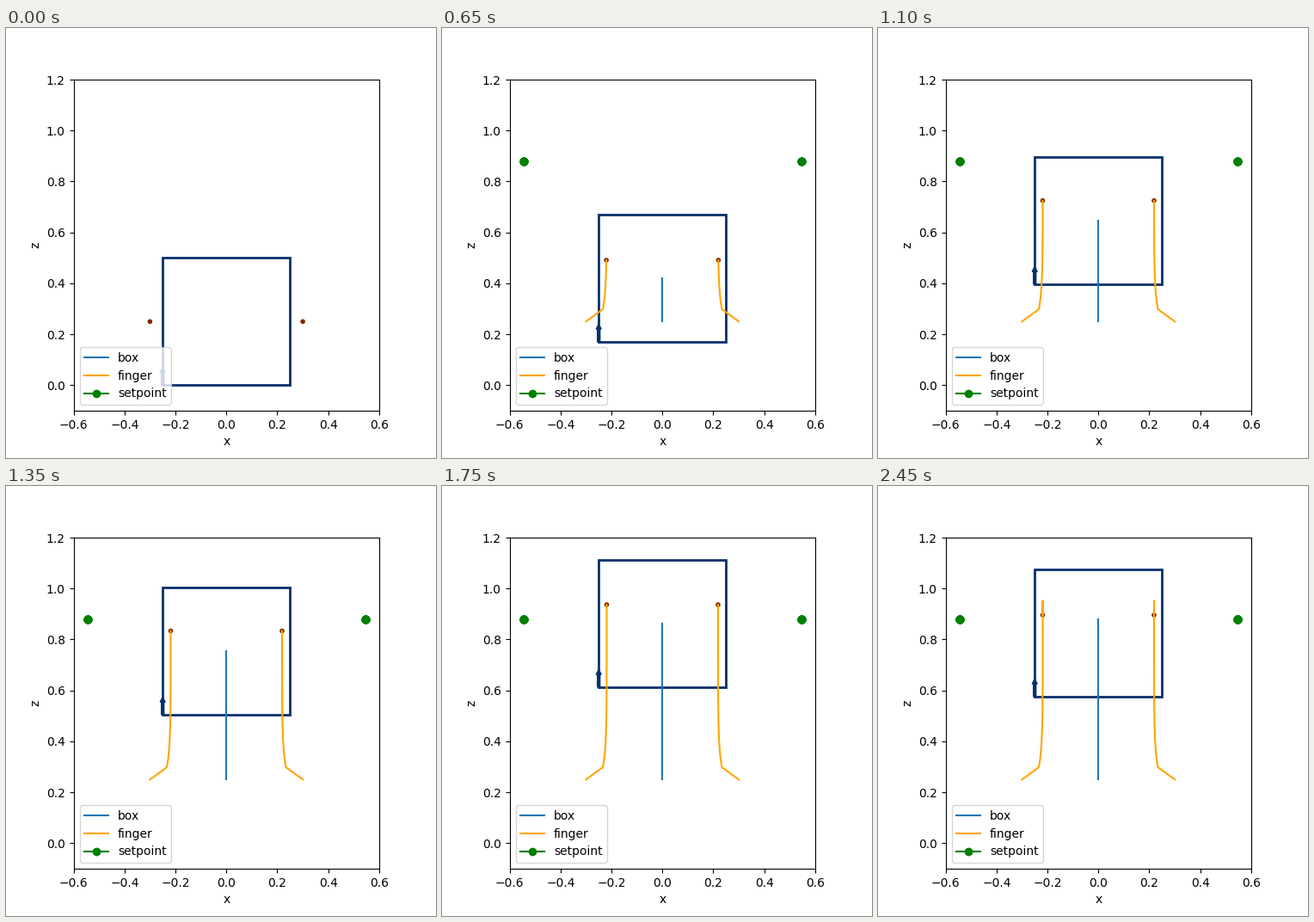
Animation, 500 px wide and 500 px high, one loop 2500 ms. Source, as a matplotlib script:

```python
import numpy as np
import matplotlib.pyplot as plt
from matplotlib.animation import FuncAnimation
from matplotlib.patches import Circle, FancyArrow, Rectangle

FRAMES, STEP_MS = 50, 50
HALF = 0.25
NAVY, BROWN = "#08306b", "#7f2704"
SETPOINT = (0.545, 0.88)

# Height of the box floor, and of the fingers above it, at key frames
KEYS = np.array([1, 4, 8, 12, 17, 27, 35, 39.5, 43, 49])
FLOOR = [0, 0.0118, 0.0645, 0.147, 0.2715, 0.5045, 0.6125, 0.631, 0.6217, 0.5755]
GRIP = [0.2985, 0.308, 0.3125, 0.319, 0.3255, 0.329, 0.324, 0.321, 0.3213, 0.3205]


def smooth(t, keys, values):
    """Cubic Hermite curve through the keys."""
    values = np.asarray(values)
    slope = np.gradient(values, keys)
    i = np.clip(np.searchsorted(keys, t, side="right") - 1, 0, len(keys) - 2)
    h = keys[i + 1] - keys[i]
    u = (t - keys[i]) / h
    return ((1 + 2 * u) * (1 - u) ** 2 * values[i]
            + u * (1 - u) ** 2 * h * slope[i]
            + u ** 2 * (3 - 2 * u) * values[i + 1]
            + u ** 2 * (u - 1) * h * slope[i + 1])


t = np.maximum(np.arange(FRAMES), 1)
floor = smooth(t, KEYS, FLOOR)
center = floor + HALF
finger_z = floor + smooth(t, KEYS, GRIP)
finger_x = 0.2186 + 0.0152 * np.exp(-(finger_z - GRIP[0]) / 0.08)
# The fingers start outside the box and snap inwards
finger_x[0], finger_z[0] = 0.3, 0.25

fig, ax = plt.subplots(figsize=(5, 5), dpi=100)
ax.set_aspect("equal")
ax.set_xlim(-0.6, 0.6)
ax.set_ylim(-0.1, 1.2)
ax.set_xlabel("x")
ax.set_ylabel("z")

box = ax.add_patch(Rectangle((-HALF, 0), 2 * HALF, 2 * HALF,
                             fill=False, ec=NAVY, lw=2))
arrow = ax.add_patch(FancyArrow(-HALF, 0, 0, 0.05, width=0.01, head_width=0.02,
                                head_length=0.02, color=NAVY, lw=1))
sides = (-1, 1)
tips = [ax.add_patch(Circle((0, 0), 0.0095, fc=BROWN, lw=0)) for _ in sides]

box_trace, = ax.plot([], [], color="C0", label="box")
finger_traces = [ax.plot([], [], color="orange")[0] for _ in sides]
setpoints = [ax.plot([], [], "o-", color="green")[0] for _ in sides]
finger_traces[0].set_label("finger")
setpoints[0].set_label("setpoint")
ax.legend(loc="lower left")


def draw(n):
    past = slice(0, n + 1)
    box.set_y(floor[n])
    arrow.set_data(y=floor[n])
    box_trace.set_data(np.zeros(n + 1), center[past])
    for side, tip, trace, goal in zip(sides, tips, finger_traces, setpoints):
        tip.center = side * finger_x[n], finger_z[n]
        trace.set_data(side * finger_x[past], finger_z[past])
        goal.set_data([side * SETPOINT[0]] * n, [SETPOINT[1]] * n)
    return [box, arrow, box_trace, *tips, *finger_traces, *setpoints]


anim = FuncAnimation(fig, draw, frames=FRAMES, interval=STEP_MS,
                     repeat=True, repeat_delay=0, blit=False)
plt.show()
```
